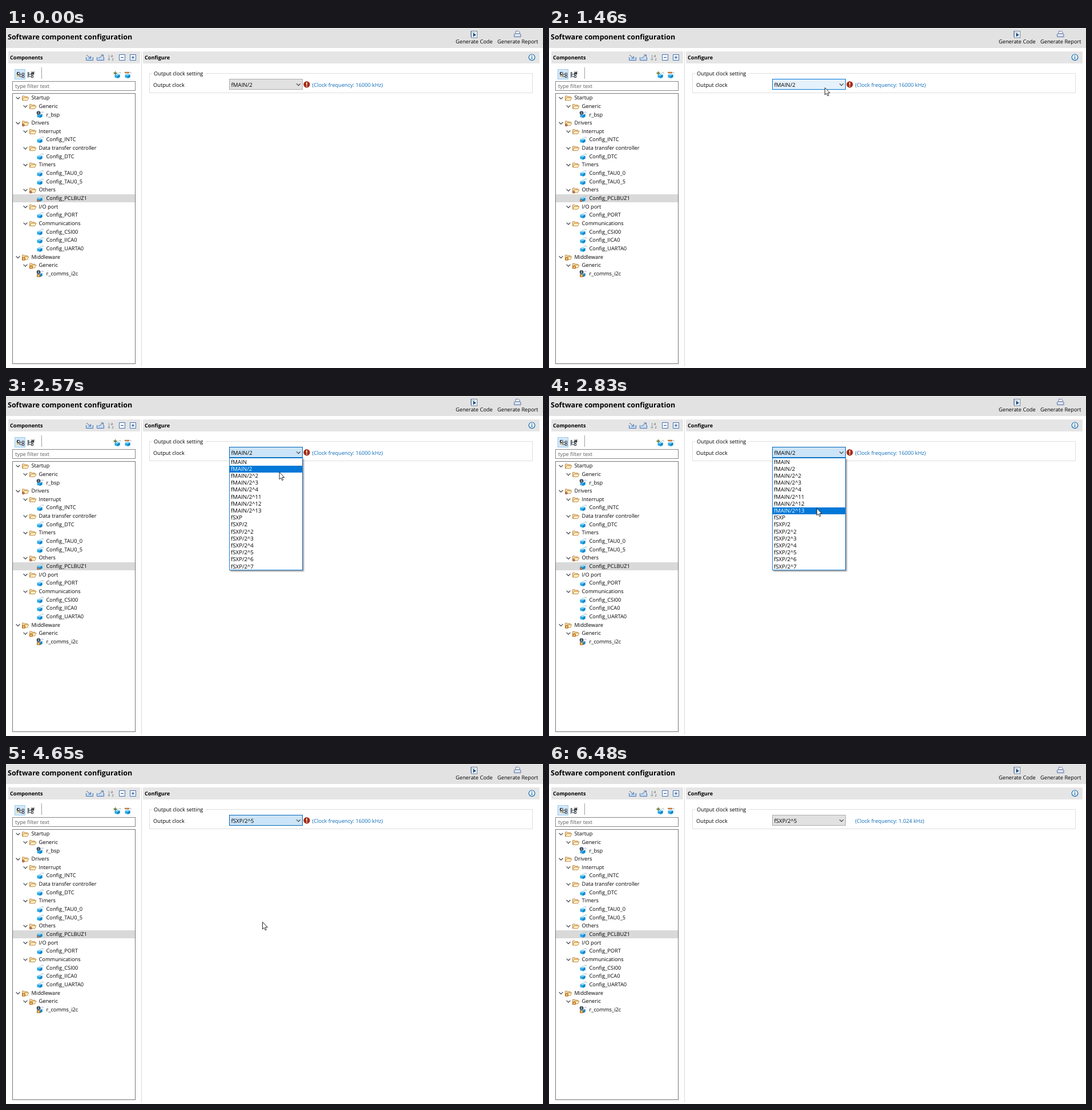
An HTML page for the animation above (7.38 s loop, 941 by 595 pixels).

```html
<!DOCTYPE html>
<html lang="en">
<head>
<meta charset="utf-8">
<title>Software component configuration</title>
<style>
  html, body { margin: 0; width: 100%; height: 100%; overflow: hidden; background: #fff; }
  svg { display: block; width: 941px; height: 595px; }
  text { font: 9.25px "Open Sans", "Noto Sans", sans-serif; fill: #000; text-rendering: geometricPrecision; white-space: pre; }
  .bold { font-weight: 700; font-size: 9.1px; }
  .title { font-weight: 700; font-size: 12.5px; }
  .combo { font-size: 9.7px; }
  .small { font-size: 7px; }
  .blue { fill: #0b6cbb; }
  .hint { fill: #606060; }
  .chevron { fill: none; stroke: #404040; stroke-width: 1.2; }
  .picked { fill: #fff; }
  #list { filter: drop-shadow(2px 2px 1px rgba(0, 0, 0, .4)); }
</style>
</head>
<body>
<svg viewBox="0 0 941 595" xmlns="http://www.w3.org/2000/svg">
  <defs>
    <g id="folder" stroke="#b9813a" stroke-width=".9" stroke-linejoin="round">
      <path d="M-5.5 4V-3.5H-2L-1-2.3H3.6V0" fill="#fbe3ab"/>
      <path d="M-5.5 4.2L-3-.6H6L3.6 4.2Z" fill="#fff0c4"/>
    </g>
    <g id="cube">
      <path d="M-5.5-.5L-1.500-2.500L3.500-1V3.500L-.5 5.500L-5.500 4Z" fill="#2ba7ea"/>
      <path d="M-5.500-.5L-1.500-2.500L3.500-1L-.5 1Z" fill="#8fd6f8"/>
      <path d="M-.5 1L3.500-1V3.500L-.5 5.500Z" fill="#1583c6"/>
      <path d="M0-3.400L5-5.200V-2.500" fill="none" stroke="#a9c6d6"/>
    </g>
    <g id="info">
      <circle cx="-3" cy="-3.2" r="3.3" fill="#3e4656"/>
      <path d="M-3-5.3v1M-3-3.6v2.4" stroke="#fff" stroke-width="1.1"/>
    </g>
    <g id="lock">
      <rect x="-5.5" y="1" width="5" height="4.4" fill="#e69a32" stroke="#9a601c" stroke-width=".7"/>
      <path d="M-3 2v2.3" stroke="#fff3cf"/>
    </g>
    <g id="fault">
      <circle cx="-3.7" cy="3.6" r="2.2" fill="#9b4a22"/>
      <path d="M-3.7 2.3v2.4" stroke="#fff" stroke-width=".8"/>
    </g>
    <path id="down" class="chevron" d="M-3.4-1.7L0 1.7L3.4-1.7"/>
    <g id="nodes" fill="#fff" stroke="#333c48" stroke-width="1">
      <path d="M-3-4V4H2M-3 0H2" fill="none"/>
      <rect x="1.5" y="-2" width="3" height="3"/>
      <rect x="1.5" y="2.5" width="3" height="3"/>
    </g>
    <clipPath id="reveal"><rect id="window" x="391" y="108" width="131"/></clipPath>
  </defs>

  <rect y="2" width="941" height="33" fill="#e2e2e2"/>
  <path d="M0 1.5H941" stroke="#d4d4d4"/>
  <text class="title" x="3" y="20.3">Software component configuration</text>
  <g transform="translate(820 11)">
    <rect x="-4.5" y="-5.5" width="10" height="11.5" fill="#fff" stroke="#6f8099"/>
    <path d="M-5.5-5.5V5M-3-3H3" stroke="#3f6490" stroke-dasharray="1.5 1"/>
    <path d="M-1.5-2.5V4.5L4 1Z" fill="#174f91"/>
  </g>
  <g transform="translate(896 11)" stroke="#6378a0">
    <path d="M-3-1V-5.5H2.5L4-4V-1" fill="#fff"/>
    <path d="M-5.5 4.5V0L-4-1.5H4.5L6 0V4.5Z" fill="#c8d5ed"/>
    <path d="M-3.5 2H4" stroke="#fff"/>
  </g>
  <text x="788" y="27.3">Generate Code</text>
  <text x="861" y="27.3">Generate Report</text>

  <path d="M4 41H235V62H4ZM240 41H935V62H240Z" fill="#e5e5e5"/>
  <path d="M237.5 41V592" stroke="#d9d9d9"/>
  <text class="bold" x="7" y="54.6">Components</text>
  <text class="bold" x="243" y="54.6">Configure</text>

  <g fill="none" stroke="#4671ab">
    <path d="M140.5 51V56.5H152.5V51M159.5 51V56.5H171.5V51" fill="#c9daf0"/>
    <path d="M141 47L148 52.5M148.5 49V53H144.5M162 53L170 47.5M166 47H170.5V51"/>
    <path d="M180.5 47V56M178.5 54L180.5 56.5L182.5 54" stroke="#8998aa"/>
    <path d="M198.5 46.5H208.5V56.5H198.5ZM217.5 46.5H227.5V56.5H217.5Z" fill="#f4f9ff"/>
    <path d="M201 51.5H206M220 51.5H225M222.5 49V54" stroke="#234f8c"/>
  </g>
  <text class="hint small" x="183.5" y="51">a</text>
  <text class="hint small" x="185.5" y="57">z</text>
  <g fill="none" stroke="#1769aa">
    <circle cx="921.5" cy="51.3" r="5.3" stroke-width="1.2" fill="#f6fbff"/>
    <path d="M921.5 48v1.4M921.5 50.5v4" stroke-width="1.5"/>
  </g>

  <rect x="15.5" y="72.5" width="18" height="17" fill="#d3e8f8" stroke="#9ccbea"/>
  <use href="#nodes" x="27" y="81"/>
  <use href="#nodes" x="43" y="81"/>
  <path d="M19 83.5H23" stroke="#d29732" stroke-width="2"/>
  <text class="bold" x="18.5" y="82">c</text>
  <text class="bold small" x="44.5" y="81">H</text>
  <path d="M38.5 77V87" stroke="#333c48"/>
  <path d="M62.5 69V89" stroke="#a0a0a0"/>
  <use href="#cube" x="196" y="82.5"/>
  <path d="M191.5 76V82M188.5 79H194.5" stroke="#6b7d3d" stroke-width="1.8"/>
  <use href="#cube" x="214" y="82.5"/>
  <path d="M208 78H216" stroke="#c47a3d" stroke-width="2.5"/>

  <rect x="11.5" y="93.5" width="215" height="16" fill="#fff" stroke="#858585"/>
  <text class="hint" x="16" y="104.8">type filter text</text>
  <rect x="11.5" y="114.5" width="215" height="473" fill="#fff" stroke="#70757b"/>
  <rect x="12" y="291" width="214" height="14" fill="#d9d9d9"/>
  <g id="tree"></g>

  <path d="M256 79.5H251.5V113.5H922.5V79.5H350" fill="none" stroke="#dedede"/>
  <text x="259" y="83.2">Output clock setting</text>
  <text x="258" y="102.5">Output clock</text>
  <text class="blue" id="frequency" x="536.5" y="102.5"></text>
  <g id="error">
    <circle cx="527" cy="98.8" r="5.6" fill="#a62c12"/>
    <path d="M527 95.3v4.2M527 100.8v1.7" stroke="#fff" stroke-width="1.7"/>
  </g>

  <g id="list">
    <rect id="panel" x="391" y="108" width="129" fill="#fff"/>
    <g clip-path="url(#reveal)">
      <g id="content">
        <rect x="391.5" y="108.5" width="128" height="196" fill="#fff" stroke="#1b7fd4"/>
        <rect id="highlight" x="392" width="127" height="12" fill="#0078d7"/>
        <g id="options"></g>
      </g>
    </g>
  </g>
  <rect id="combo" x="391.5" y="89.5" width="128" height="18"/>
  <text class="combo" id="value" x="394.5" y="102.5"></text>
  <use href="#down" x="512.5" y="99"/>

  <path id="pointer" d="M.5.5V13L3.3 10.4L5.2 14.8L7.2 14L5.4 9.7H9.3Z" fill="#fff" stroke="#111" stroke-width=".9" stroke-linejoin="round"/>
</svg>
<script>
  const LOOP = 7380;
  const ROW = 12.2, ROWS_TOP = 109.4, LIST_HEIGHT = 197, UNPAINTED = 18;
  const OPEN = 1890, SLIDE = 243, CHOSEN = 4650, FADE = 260;
  const $ = id => document.getElementById(id);

  // level, label, markers
  const tree = [
    [0, 'Startup'], [1, 'Generic'], [2, 'r_bsp', 'info'],
    [0, 'Drivers', 'fault'], [1, 'Interrupt'], [2, 'Config_INTC'],
    [1, 'Data transfer controller'], [2, 'Config_DTC'],
    [1, 'Timers'], [2, 'Config_TAU0_0'], [2, 'Config_TAU0_5'],
    [1, 'Others', 'fault'], [2, 'Config_PCLBUZ1', 'fault'],
    [1, 'I/O port'], [2, 'Config_PORT'],
    [1, 'Communications'], [2, 'Config_CSI00'], [2, 'Config_IICA0'], [2, 'Config_UARTA0'],
    [0, 'Middleware', 'lock'], [1, 'Generic', 'lock'], [2, 'r_comms_i2c', 'info lock']
  ];
  const options = [
    ...['', '/2', '/2^2', '/2^3', '/2^4', '/2^11', '/2^12', '/2^13'].map(s => 'fMAIN' + s),
    ...['', '/2', '/2^2', '/2^3', '/2^4', '/2^5', '/2^6', '/2^7'].map(s => 'fSXP' + s)
  ];

  const use = (id, x, y) => `<use href="#${id}" class="${id}" x="${x}" y="${y}"/>`;

  $('tree').innerHTML = tree.map(([level, label, marks = ''], i) => {
    const x = 34 + 13 * level, y = 122 + 14.65 * i;
    const icons = [level < 2 ? 'folder' : 'cube', ...marks.split(' ').filter(Boolean)];
    return (level < 2 ? use('down', x - 13, y + .5) : '') +
      icons.map(id => use(id, x, y + .5)).join('') +
      `<text x="${x + 10.5}" y="${y + 3.2}">${label}</text>`;
  }).join('');

  $('options').innerHTML = options.map((label, i) =>
    `<text class="combo" x="394" y="${ROWS_TOP + ROW * i + 9.2}">${label}</text>`).join('');

  const optionTexts = [...$('options').children];
  const faults = [...document.querySelectorAll('use.fault')];

  // time, x, y, ease-out power of the move that ends here
  const path = [
    [290, 876, 588], [780, 395, 73, 1.5], [980, 395, 73], [1460, 483, 104, 1.5],
    [2470, 483, 104], [3190, 461, 246, 1.5], [3220, 461, 246], [3550, 449, 276, 1.5],
    [5090, 449, 276], [5390, 737, 339, 1.5], [5750, 737, 339], [6480, 868, 595]
  ];

  function pointerAt(t) {
    const next = path.findIndex(key => key[0] > t);
    if (next < 1) return null;
    const [t0, x0, y0] = path[next - 1];
    const [t1, x1, y1, power = 1] = path[next];
    const p = 1 - (1 - (t - t0) / (t1 - t0)) ** power;
    return { x: x0 + (x1 - x0) * p, y: y0 + (y1 - y0) * p };
  }

  const show = (element, visible) => element.setAttribute('visibility', visible ? 'visible' : 'hidden');
  const clamp = v => Math.min(1, Math.max(0, v));

  function drawCombo(t, pointer) {
    let fill = '#e1e1e1', stroke = '#adadad';
    if (t >= CHOSEN) {
      const fade = 100 * clamp((t - CHOSEN) / FADE);
      fill = `color-mix(in srgb, #cce4f7, #e1e1e1 ${fade}%)`;
      stroke = `color-mix(in srgb, #0067b8, #adadad ${fade}%)`;
    } else if (t >= OPEN + SLIDE) {
      fill = '#cce4f7';
      stroke = '#0067b8';
    } else if (pointer && pointer.y >= 89 && pointer.y < 108) {
      fill = '#e5f1fb';
      stroke = '#0078d7';
    }
    $('combo').style.fill = fill;
    $('combo').style.stroke = stroke;
    $('value').textContent = t < CHOSEN ? 'fMAIN/2' : 'fSXP/2^5';
  }

  function drawList(t, pointer) {
    const open = t >= OPEN && t < CHOSEN;
    $('list').style.display = open ? '' : 'none';
    if (!open) return;
    // The list slides down from the box; its lowest strip is painted last.
    const progress = clamp((t - OPEN) / SLIDE);
    const height = LIST_HEIGHT * progress;
    $('panel').setAttribute('height', height);
    $('window').setAttribute('height', progress < 1 ? Math.max(0, height - UNPAINTED) : height);
    $('content').setAttribute('transform', `translate(0 ${height - LIST_HEIGHT})`);
    const row = pointer.y < ROWS_TOP ? 1 : Math.floor((pointer.y - ROWS_TOP) / ROW);
    $('highlight').setAttribute('y', Math.round(ROWS_TOP + ROW * row));
    optionTexts.forEach((text, i) => text.classList.toggle('picked', i === row));
  }

  function draw(t) {
    const pointer = pointerAt(t);
    show($('pointer'), pointer);
    if (pointer) $('pointer').setAttribute('transform', `translate(${pointer.x} ${pointer.y})`);
    drawCombo(t, pointer);
    drawList(t, pointer);
    $('frequency').textContent = `(Clock frequency: ${t < 4750 ? '16000' : '1.024'} kHz)`;
    show($('error'), t < 4750);
    faults.forEach(mark => show(mark, t < 4850));
  }

  const start = performance.now();
  function tick() {
    draw((performance.now() - start) % LOOP);
    requestAnimationFrame(tick);
  }
  tick();
</script>
</body>
</html>
```
